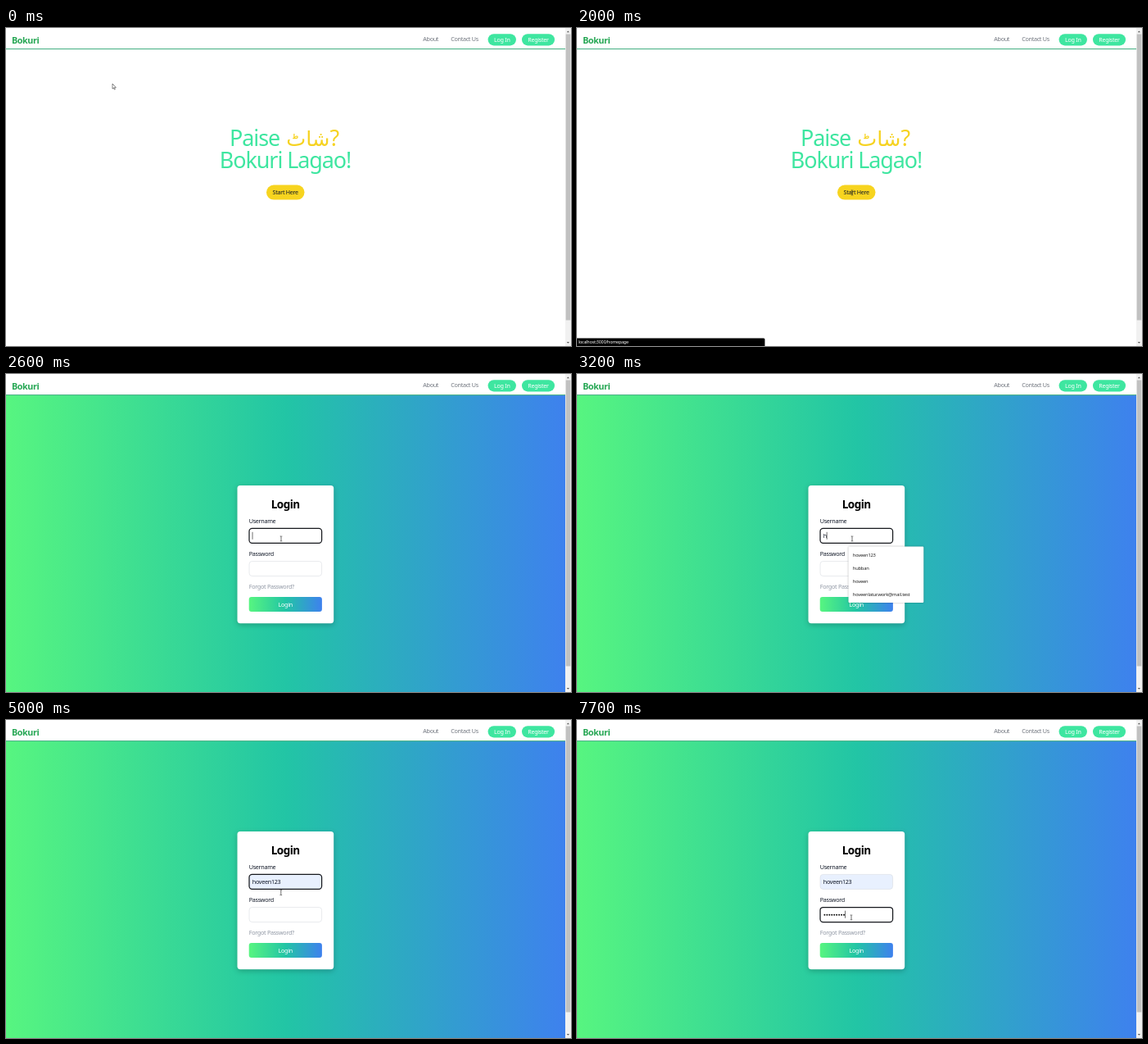
An HTML page for the animation above (8000 ms loop, 690 by 388 pixels).

```html
<!DOCTYPE html>
<html lang="en">
<head>
<meta charset="utf-8">
<title>Sign in</title>
<style>
  html, body { margin: 0; width: 100%; height: 100%; overflow: hidden; background: #fff; }
  svg { display: block; width: 690px; height: 388px; }
  text { font: 7.19px "Noto Sans", "Open Sans", sans-serif; letter-spacing: -.04em; fill: #111827; white-space: pre; }
  .mid { text-anchor: middle; }
  .link { fill: #71767f; }
  .light { fill: #fff; }
  .logo { font-size: 10.78px; font-weight: 700; fill: #25a653; }
  .hero { font-size: 26.95px; fill: #3ee6a0; }
  .hero.gold { fill: #f6d322; }
  .urdu { font-family: "DejaVu Sans", sans-serif; font-size: 25.5px; letter-spacing: 0; text-anchor: end; }
  .title { font-size: 13.5px; font-weight: 700; fill: #000; }
  .label { font-weight: 500; }
  .muted { font-weight: 500; fill: #8f96a3; }
  .small { font-size: 5.8px; fill: #222; }
  .status { font-size: 5.4px; fill: #fff; }
  .pill { fill: #3ee6a0; }
  .card { filter: drop-shadow(0 2px 3px rgba(0, 0, 0, .22)); }
  .popup { filter: drop-shadow(0 .8px 1.2px rgba(0, 0, 0, .3)); }
</style>
</head>
<body>
<svg viewBox="0 0 690 388" xmlns="http://www.w3.org/2000/svg">
  <defs>
    <linearGradient id="sea">
      <stop offset="0" stop-color="#57f580"/>
      <stop offset=".5" stop-color="#22c5a5"/>
      <stop offset="1" stop-color="#3e81ee"/>
    </linearGradient>
  </defs>
  <rect width="690" height="388" fill="#fff"/>

  <g id="home">
    <text class="hero" x="273" y="144">Paise</text>
    <text class="hero gold urdu" x="395.5" y="144">شاٹ</text>
    <text class="hero gold" x="395.5" y="144">?</text>
    <text class="hero mid" x="341" y="171">Bokuri Lagao!</text>
    <rect x="318" y="191.6" width="46.5" height="17.9" rx="8.95" fill="#f7d41f"/>
    <text class="mid" x="341.2" y="203.2">Start Here</text>
  </g>

  <g id="login">
    <rect y="26" width="683" height="362" fill="url(#sea)"/>
    <rect class="card" x="282.5" y="136" width="117.7" height="168.2" rx="3.6" fill="#fff"/>
    <text class="title mid" x="341.2" y="164">Login</text>
    <text class="label" x="296.7" y="182">Username</text>
    <rect id="userBox" x="297" y="188.4" width="88.6" height="18" rx="3.6"/>
    <text id="user" x="300.8" y="200.2"></text>
    <text class="label" x="296.7" y="222.1">Password</text>
    <rect id="passBox" x="297" y="228.5" width="88.6" height="18" rx="3.6"/>
    <g id="dots" fill="#111"></g>
    <text class="muted" x="296.7" y="262.4">Forgot Password?</text>
    <rect x="296.7" y="272" width="89.2" height="18" rx="3" fill="url(#sea)"/>
    <text class="light mid" x="341.2" y="283.8">Login</text>
    <rect id="caret" width=".6" height="9" fill="#111"/>
    <g id="popup">
      <rect class="popup" x="331.5" y="210.6" width="91.8" height="68.4" rx="1.2" fill="#fff"/>
      <rect id="pick" x="331.5" y="212.8" width="91.8" height="16.1" fill="#e9e9ea"/>
    </g>
  </g>

  <rect width="683" height="25.2" fill="#fff"/>
  <rect y="25" width="683" height="1.1" fill="#4fb489"/>
  <text class="logo" x="7" y="18.7">Bokuri</text>
  <text class="link" x="509.2" y="15.6">About</text>
  <text class="link" x="543.2" y="15.6">Contact Us</text>
  <rect class="pill" x="588.6" y="7.2" width="34.3" height="14.2" rx="7.1"/>
  <text class="light mid" x="605.8" y="17.2">Log In</text>
  <rect class="pill" x="630" y="7.2" width="40" height="14.2" rx="7.1"/>
  <text class="light mid" x="650" y="17.2">Register</text>

  <rect x="683" width="7" height="388" fill="#f1f1f1"/>
  <rect x="683.7" y="7.5" width="5.6" height="349" fill="#c1c1c1"/>
  <path d="M684.8 5.2L686.4 3.4 688 5.2ZM684.8 383L686.4 384.8 688 383Z" fill="#555"/>

  <g id="status">
    <path d="M0 378.4H228Q229.4 378.4 229.4 380V388H0Z" fill="#000"/>
    <text class="status" x="1.8" y="385">localhost:3000/homepage</text>
  </g>
  <path id="arrow" d="M0 0V6.2L1.4 4.9 2.4 7.1 3.3 6.7 2.4 4.6H4.3Z" fill="#fff" stroke="#222" stroke-width=".55"/>
  <path id="beam" d="M-1.3 -3H-.4L0 -2.6 .4 -3H1.3M0 -2.6V2.6M-1.3 3H-.4L0 2.6 .4 3H1.3" fill="none" stroke="#222" stroke-width=".65"/>
</svg>
<script>
  const LOOP = 8000, STEP = 100, PITCH = 2.95;
  const NAME = "hoveen123";
  const HINTS = [NAME, "hubban", "hoveen", "hoveenlatur.work@mail.test"];
  const KEYS = [6000, 6300, 6500, 6900, 7000, 7200, 7300, 7500, 7700];
  // pointer stops: time, x, y
  const PATH = [[0, 130, 68], [400, 200, 131], [600, 200, 131], [1500, 336, 201],
                [4100, 336, 201], [4300, 336, 203], [4900, 336, 203], [5400, 335, 241]];

  const $ = id => document.getElementById(id);
  const make = (parent, tag, attrs) => {
    const el = document.createElementNS("http://www.w3.org/2000/svg", tag);
    set(el, attrs);
    return parent.appendChild(el);
  };
  function set(el, attrs) {
    for (const key in attrs) el.setAttribute(key, attrs[key]);
  }
  const show = (id, alpha) => set($(id), { opacity: Number(alpha) });
  const ramp = (t, a, b) => Math.min(1, Math.max(0, (t - a) / (b - a)));

  HINTS.forEach((hint, i) => {
    make($("popup"), "text", { class: "small", x: 336.8, y: 222.9 + 16.1 * i }).textContent = hint;
  });
  const dots = KEYS.map((_, i) =>
    make($("dots"), "circle", { cx: 302.4 + PITCH * i, cy: 237.8, r: 1 }));

  function pointer(t) {
    let i = 0;
    while (i < PATH.length - 2 && t >= PATH[i + 1][0]) i++;
    const [t0, x0, y0] = PATH[i], [t1, x1, y1] = PATH[i + 1];
    const k = ramp(t, t0, t1);
    return `translate(${x0 + (x1 - x0) * k} ${y0 + (y1 - y0) * k})`;
  }

  function field(id, focus, fill) {
    set($(id), {
      fill,
      stroke: focus ? "#16181d" : "#d3d7dd",
      "stroke-width": focus ? 1.25 : .5
    });
  }

  function draw(t) {
    const inLogin = t >= 2100, inPass = t >= 5600, filled = t >= 3600;
    show("home", !inLogin);
    show("login", inLogin);
    show("status", t < 2400 ? ramp(t, 1300, 1600) : 0);

    field("userBox", t >= 2600 && !inPass, filled ? "#e8f0fe" : "#fff");
    field("passBox", inPass, "#fff");
    $("user").textContent = filled ? NAME : t >= 3100 ? NAME[0] : "";
    show("popup", t >= 3200 && t < 3700);
    show("pick", filled);

    const typed = KEYS.filter(k => t >= k).length;
    dots.forEach((dot, i) => set(dot, { opacity: i < typed ? 1 : 0 }));
    show("caret", inPass || (t >= 2600 && !filled));
    set($("caret"), {
      x: inPass ? 300.7 + PITCH * typed : t >= 3100 ? 304.8 : 300.7,
      y: inPass ? 232.7 : 192.8
    });

    const place = { transform: pointer(t) };
    set($("arrow"), place);
    set($("beam"), place);
    show("arrow", t < 1400);
    show("beam", t >= 1400);
  }

  const start = performance.now();
  function tick() {
    const t = (performance.now() - start) % LOOP;
    draw(Math.floor(t / STEP) * STEP);
    requestAnimationFrame(tick);
  }
  tick();
</script>
</body>
</html>
```
